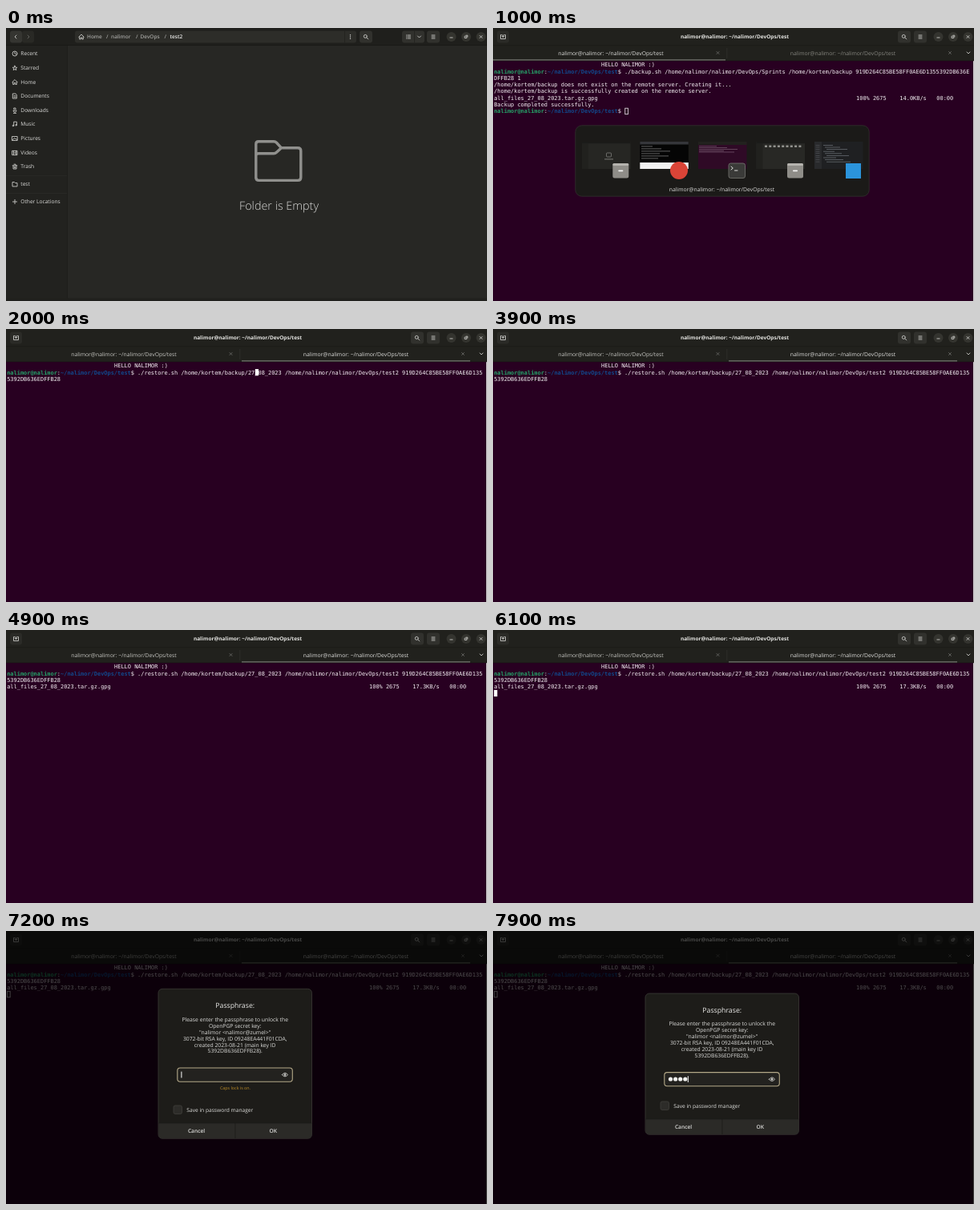
An HTML page that plays this animation: 600x341 px, repeating every 8 s.

```html
<!DOCTYPE html>
<html lang="en">
<head>
<meta charset="utf-8">
<title>Backup and restore</title>
<style>
html, body { margin: 0; width: 100%; height: 100%; overflow: hidden; background: #20201d; }
svg { display: block; width: 600px; height: 341px; }
text { font-family: "Open Sans", "Noto Sans", sans-serif; font-size: 6.65px; fill: #dcdcda;
  white-space: pre; text-rendering: geometricPrecision; }
.mid { text-anchor: middle; }
.title { font-size: 6.5px; font-weight: 700; fill: #e6e6e3; }
.crumb { font-size: 6.5px; font-weight: 600; fill: #a3a3a0; }
.here { fill: #ededeb; }
.empty { font-size: 14.4px; font-weight: 300; }
.tab { font-size: 6.8px; }
#tabA .off { fill: #85857f; }
#tabB .off { fill: #c4c4c0; }
.mono { font-family: "DejaVu Sans Mono", monospace; font-size: 6.95px; fill: #f4f1f3; }
.user { fill: #26a269; font-weight: 700; }
.path { fill: #12488b; font-weight: 700; }
.head { font-size: 8.75px; fill: #ececea; }
.caps { font-size: 5.35px; fill: #bd8d27; }
.btn { font-weight: 600; }
.line { fill: none; stroke: #c9c9c6; stroke-width: .9; stroke-linecap: round; stroke-linejoin: round; }
.dim { stroke: #666663; }
</style>
</head>
<body>
<svg id="stage" viewBox="0 0 600 341"></svg>
<script>
const LOOP = 8000;
const COL = 4.184, ROW = 8.3;
const TERM = "#280021";
const USER = "nalimor";
const TITLE = `${USER}@${USER}: ~/${USER}/DevOps/test`;
const BACKUP = "/home/kortem/backup";
const ARCHIVE = "all_files_27_08_2023.tar.gz.gpg";

const esc = s => s.replace(/&/g, "&amp;").replace(/</g, "&lt;");
const text = (x, y, s, cls = "") => `<text x="${x}" y="${y}" class="${cls}">${esc(s)}</text>`;
const rect = (x, y, w, h, fill, r = 0, more = "") =>
  `<rect x="${x}" y="${y}" width="${w}" height="${h}" rx="${r}" fill="${fill}" ${more}/>`;
const disc = (x, y, r, fill) => `<circle cx="${x}" cy="${y}" r="${r}" fill="${fill}"/>`;
const line = (d, cls = "", more = "") => `<path class="line ${cls}" d="${d}" ${more}/>`;
const icon = (x, y, d, cls = "") => line(d, cls, `transform="translate(${x} ${y})"`);
const group = (id, body) => `<g id="${id}">${body}</g>`;

const ICON = {
  home: "M-3.2 .2L0 -3L3.2 .2M-2.3 0V3H-.8V1H.8V3H2.3V0",
  bars: "M-2 -2H2M-2 0H2M-2 2H2",
  close: "M-1.5 -1.5L1.5 1.5M1.5 -1.5L-1.5 1.5",
  down: "M-2 -1L0 1L2 -1",
  search: "M1.3 -.6A2 2 0 1 1 -2.7 -.6A2 2 0 1 1 1.3 -.6M.8 .9L2.8 2.9",
  folder: "M-3 2.5V-2.5H-.5L.5 -1.4H3V2.5Z"
};

// Window buttons, search and menu shared by both windows
const controls = searchX =>
  rect(searchX, 3.5, 16, 15, "#31312d", 3) + icon(searchX + 8, 11, ICON.search) +
  rect(525, 3.5, 16, 15, "#31312d", 3) + icon(533, 11, ICON.bars) +
  [555.5, 574, 592.5].map(x => disc(x, 11, 6, "#34342f")).join("") +
  icon(555.5, 12, "M-1.6 0H1.6") + icon(574, 11, "M-1.5 -.8H.8V1.5H-1.5ZM0 -1.8H1.8V0") +
  icon(592.5, 11, ICON.close);

function files() {
  const places = [
    ["Recent", 32, "M3 0A3 3 0 1 1 -3 0A3 3 0 1 1 3 0M0 -1.8V0L1.4 .8"],
    ["Starred", 50, "M0 -2.8L.8 -.8L2.9 -.7L1.3 .6L1.8 2.6L0 1.5L-1.8 2.6L-1.3 .6L-2.9 -.7L-.8 -.8Z"],
    ["Home", 67.5, ICON.home],
    ["Documents", 85, "M-2.3 -3H1L2.3 -1.6V3H-2.3ZM-1 -.3H1M-1 1.3H1"],
    ["Downloads", 103, "M-1 -3H1V.5H2.2L0 2.6L-2.2 .5H-1ZM-1.6 3.4H1.6"],
    ["Music", 120, "M-1.3 2V-2.8H2.4V1.2M-1.3 2A.8 .8 0 1 1 -2.9 2A.8 .8 0 1 1 -1.3 2M2.4 1.2A.8 .8 0 1 1 .8 1.2A.8 .8 0 1 1 2.4 1.2"],
    ["Pictures", 138, "M-3.2 -2.5H3.2V2.5H-3.2ZM-2.5 1.6L-.6 -.6L.8 1L1.6 .2L2.6 1.6"],
    ["Videos", 156, "M-3 -2.6H3V2.6H-3ZM-1.6 -2.6V2.6M1.6 -2.6V2.6M-1.6 0H1.6"],
    ["Trash", 173, "M-2.8 -1.2H2.8M-1 -2.8H1V-1.4M-2 -1V3H2V-1M-.7 .4V1.8M.7 .4V1.8"],
    ["test", 195, ICON.folder],
    ["Other Locations", 217, "M-2.6 0H2.6M0 -2.6V2.6"]
  ];
  const crumbs = [[101, "Home"], [125, "/"], [131, USER], [162, "/"], [167.5, "DevOps"], [197.5, "/"]];
  return rect(0, 0, 600, 341, "#272724") + rect(0, 22, 76, 319, "#22221f") +
    rect(0, 0, 600, 22, "#1f1f1c") + rect(0, 21.3, 600, .7, "#171715") +
    rect(76, 22, .7, 316, "#1c1c19") + rect(0, 337.5, 600, 3.5, "#20201d") +
    rect(5, 3.5, 15, 15, "#353531", 3) + rect(20, 3.5, 15, 15, "#292925", 3) +
    icon(12, 11, "M1 -2L-1 0L1 2") + icon(28, 11, "M-1 -2L1 0L-1 2", "dim") +
    rect(86, 3.5, 351, 15, "#2d2d29", 3) + rect(422, 3.5, .7, 15, "#20201d") +
    icon(94, 11, ICON.home) +
    crumbs.map(([x, s]) => text(x, 13.4, s, "crumb")).join("") + text(204.5, 13.4, "test2", "crumb here") +
    [8.7, 11, 13.3].map(y => disc(429.5, y, .7, "#d0d0cd")).join("") +
    rect(494, 3.5, 28, 15, "#31312d", 3) + rect(509, 3.5, .7, 15, "#20201d") +
    icon(502, 11, "M-2.5 -2H-1.8M-.5 -2H2.5M-2.5 0H-1.8M-.5 0H2.5M-2.5 2H-1.8M-.5 2H2.5") +
    icon(515.5, 11, ICON.down) + controls(441) +
    places.map(([s, y, d]) => icon(11, y, d) + text(18.3, y + 2.4, s)).join("") +
    rect(0, 184, 76, .7, "#2c2c29") + rect(0, 206, 76, .7, "#2c2c29") +
    `<path d="M311.8 188V145Q311.8 141.8 315 141.8H334Q336 141.8 337.5 143.3L343.5 149.8H364Q367.8 149.8 367.8 153.6V186.5Q367.8 190.4 364 190.4H315.5Q311.8 190.4 311.8 186.5M311.8 159Q312 156.8 315 156.8H334Q336 156.8 337.5 155.3L343.5 149.8" fill="none" stroke="#90908d" stroke-width="3.4"/>` +
    text(340.5, 226.8, "Folder is Empty", "empty mid");
}

// Terminal helpers: rows count from 1, columns from 0
const colX = c => +(1.2 + c * COL).toFixed(2);
const rowY = n => +(48.2 + (n - 1) * ROW).toFixed(2);
const row = (n, s, col = 0) => text(colX(col), rowY(n), s, "mono");
const prompt = (n, cmd) => `<text x="${colX(0)}" y="${rowY(n)}" class="mono"><tspan class="user">${USER}@${USER}</tspan>:` +
  `<tspan class="path">~/${USER}/DevOps/test</tspan>$ ${cmd}</text>`;
const block = (n, col) => rect(colX(col), rowY(n) - 6.5, COL, 8.2, "#fff");
const hollow = (n, col) => rect(colX(col) + .4, rowY(n) - 6.1, COL - .6, 7.5, "none", 0, 'stroke="#eee" stroke-width=".8"');
const copied = (n, rate) => row(n, ARCHIVE) + row(n, `100% 2675    ${rate}   00:00`, 108);
const hello = row(1, `HELLO ${USER.toUpperCase()} :)`, 32);

const chrome = rect(0, 0, 600, 341, TERM) + rect(0, 0, 600, 41, "#21211d") +
  rect(599, 41, 1, 300, "#d2d0d1") +
  rect(0, 21.5, 600, .7, "#191916") + rect(0, 40.6, 600, .6, "#171714") +
  rect(5, 3.5, 15, 15, "#2b2b27", 3) +
  icon(12.5, 11, "M-1.6 -2.4H-3V2.6H3V-2.4H1.6M0 -2.2V.8M-1.4 -.7H1.4") +
  text(301.5, 13.4, TITLE, "title mid") + controls(505) +
  rect(291.5, 25, .7, 13, "#33332f") + icon(593, 31, ICON.down) +
  icon(280.5, 31, ICON.close, "dim") + icon(570, 31, ICON.close, "dim");

const tabs = active => [147, 436.5].map((x, i) =>
  text(x, 33.6, TITLE, i === active ? "tab mid" : "tab mid off")).join("") +
  (active ? rect(294, 39.2, 285, 1.3, "#71716b") : rect(0, 39.2, 290, 1.3, "#71716b"));

const backupTab = () => tabs(0) + hello +
  prompt(2, `./backup.sh /home/${USER}/${USER}/DevOps/Sprints ${BACKUP} 919D264C85BE58FF0AE6D1355392DB636E`) +
  row(3, "DFFB28 1") +
  row(4, BACKUP + " does not exist on the remote server. Creating it...") +
  row(5, BACKUP + " is successfully created on the remote server.") +
  copied(6, "14.0KB/s") + row(7, "Backup completed successfully.") + prompt(8, "") +
  hollow(8, 39);

const restoreTab = () => tabs(1) + hello +
  prompt(2, `./restore.sh ${BACKUP}/27_08_2023 /home/${USER}/${USER}/DevOps/test2 919D264C85BE58FF0AE6D135`) +
  row(3, "5392DB636EDFFB28") + group("output", copied(4, "17.3KB/s")) +
  group("curEdit", block(2, 74) + `<text x="${colX(74)}" y="${rowY(2)}" class="mono" style="fill:${TERM}">_</text>`) +
  group("curWait", block(4, 0)) + group("curOut", block(5, 0)) + group("curIdle", hollow(5, 0));

function switcher() {
  const xs = [111, 183.3, 256, 328.5, 401];
  const fills = ["#262623", "#050505", "#2f0a26", "#282825", "#1f2022"];
  const cabinet = x => rect(x - 10, 169, 20, 18.5, "#8f8d88", 2.5) + rect(x - 10, 169, 20, 3, "#b5b3ae", 1.5) +
    rect(x - 3, 177.5, 6, 1.8, "#f4f4f2", .8);
  let s = rect(102.8, 121.8, 366.4, 88.4, "#1b1a18", 8, 'stroke="#32312e" stroke-width=".8"') +
    xs.map((x, i) => rect(x, 142, 60.5, 34, fills[i])).join("") +
    rect(111, 142, 60.5, 2.2, "#1b1b19") + rect(111, 144, 8, 32, "#21211e") +
    rect(141.5, 156, 6, 5, "none", 1, 'stroke="#8c8c89" stroke-width=".7"') + rect(139, 163.5, 11, .8, "#8c8c89") +
    rect(183.3, 142, 60.5, 3.5, "#35363a") + rect(183.3, 168, 60.5, 8, "#f1f1f1") +
    rect(256, 142, 60.5, 4, "#22211e") + rect(328.5, 142, 60.5, 2.2, "#1b1b19") + rect(328.5, 144, 8, 32, "#21211e") +
    rect(401, 142, 9, 34, "#292a2c");
  for (let i = 0; i < 9; i++) {
    s += rect(339 + i * 5.3, 146.5, 3, 2.5, "#92928e") +
      rect(412 + i % 3 * 2, 146 + i * 2.6, 12 + i * 7 % 19, .8, "#64696f") +
      rect(402.5, 146 + i * 2.6, 5, .6, "#55585c");
    if (i < 6) s += rect(185, 147.5 + i * 3, 14 + i * 11 % 24, .8, "#777");
    if (i < 5) s += rect(257, 147.5 + i * 1.8, 22 + i * 13 % 30, .6, "#84697d");
  }
  return s + cabinet(159.3) + disc(232, 178, 11, "#db4437") +
    rect(294, 169, 20.5, 18.5, "#3a3a38", 2.5, 'stroke="#777672" stroke-width=".8"') +
    line("M297 173L299.3 175L297 177M301.5 178H305", "", 'style="stroke:#f0f0ee"') +
    cabinet(377) + rect(440, 169, 19, 19, "#2b94dc") +
    text(285.5, 204, TITLE, "tab mid");
}

function dialog() {
  const lines = ["Please enter the passphrase to unlock the", "OpenPGP secret key:",
    `"${USER} <${USER}@zumel>"`, "3072-bit RSA key, ID 09248EA441F01CDA,",
    "created 2023-08-21 (main key ID", "5392DB636EDFFB28)."];
  const upper = text(285.7, 96, "Passphrase:", "head mid") +
    lines.map((s, i) => text(285.7, 112.9 + i * 7.9, s, "tab mid")).join("") +
    rect(213.8, 171, 143.5, 17.2, "#23221f", 3.5, 'stroke="#b3a888" stroke-width="1.1"') +
    line("M344.4 179.6Q348 174.8 351.6 179.6Q348 184.2 344.4 179.6Z") + disc(348, 179.6, 1.4, "#c9c9c6") +
    group("dots", [0, 1, 2, 3].map(i => disc(221.5 + i * 6.1, 179.4, 2.6, "#f2f2f0")).join("")) +
    `<rect id="caret" y="175.6" width="1" height="7.8" fill="#fff"/>`;
  const lower = rect(209, 218, 10.5, 10.5, "#2d2c29", 2, 'stroke="#403f3b" stroke-width=".8"') +
    text(225.3, 225.8, "Save in password manager") +
    `<path d="M190.3 240H381.2V254.5Q381.2 259 376.7 259H194.8Q190.3 259 190.3 254.5Z" fill="#2b2a27"/>` +
    rect(285.5, 240, .8, 19, "#1c1b19") + rect(190.3, 239.6, 191, .7, "#1a1917") +
    text(237.5, 252, "Cancel", "btn mid") + text(333.2, 252, "OK", "btn mid");
  return rect(0, 0, 600, 341, "#000", 0, 'opacity=".69"') +
    `<rect id="panel" x="190" width="191.5" rx="5" fill="#1d1c19" stroke="#3b3a36" stroke-width=".8"/>` +
    group("upper", upper) + group("caps", text(286, 198, "Caps lock is on.", "caps mid")) + group("lower", lower);
}

document.getElementById("stage").innerHTML =
  group("files", files()) +
  group("term", chrome + group("tabA", backupTab()) + group("tabB", restoreTab())) +
  group("switcher", switcher()) + group("dialog", dialog());

const $ = id => document.getElementById(id);

// Each part is visible during the listed [from, to) spans
const SPANS = {
  files: [[0, 1000]],
  term: [[1000, LOOP]],
  tabA: [[1000, 1600]],
  tabB: [[1600, LOOP]],
  switcher: [[800, 1300]],
  curEdit: [[1600, 2500]],
  curWait: [[2700, 3100], [3500, 3900]],
  output: [[4100, LOOP]],
  curOut: [[4300, 4900], [5300, 5700], [6100, 6200]],
  curIdle: [[6200, LOOP]],
  dialog: [[6200, LOOP]],
  caps: [[6200, 7400]],
  caret: [[6200, 6600], [7000, LOOP]]
};
const KEYS = [7500, 7600, 7750, 7900];

function draw(t) {
  for (const id in SPANS) {
    const on = SPANS[id].some(([a, b]) => t >= a && t < b);
    $(id).style.display = on ? "" : "none";
  }
  $("switcher").style.opacity = t < 1200 ? 1 : Math.max(0, .5 - (t - 1200) / 200);

  const compact = t >= 7400;
  const typed = KEYS.filter(k => t >= k).length;
  $("panel").setAttribute("y", compact ? 78 : 72.3);
  $("panel").setAttribute("height", compact ? 176.2 : 186.9);
  $("upper").setAttribute("transform", `translate(0 ${compact ? 5.6 : 0})`);
  $("lower").setAttribute("transform", `translate(0 ${compact ? -5 : 0})`);
  [...$("dots").children].forEach((dot, i) => dot.style.display = i < typed ? "" : "none");
  $("caret").setAttribute("x", 218.4 + typed * 6.1);
}

const start = performance.now();
function tick() {
  draw((performance.now() - start) % LOOP);
  requestAnimationFrame(tick);
}
tick();
</script>
</body>
</html>
```
